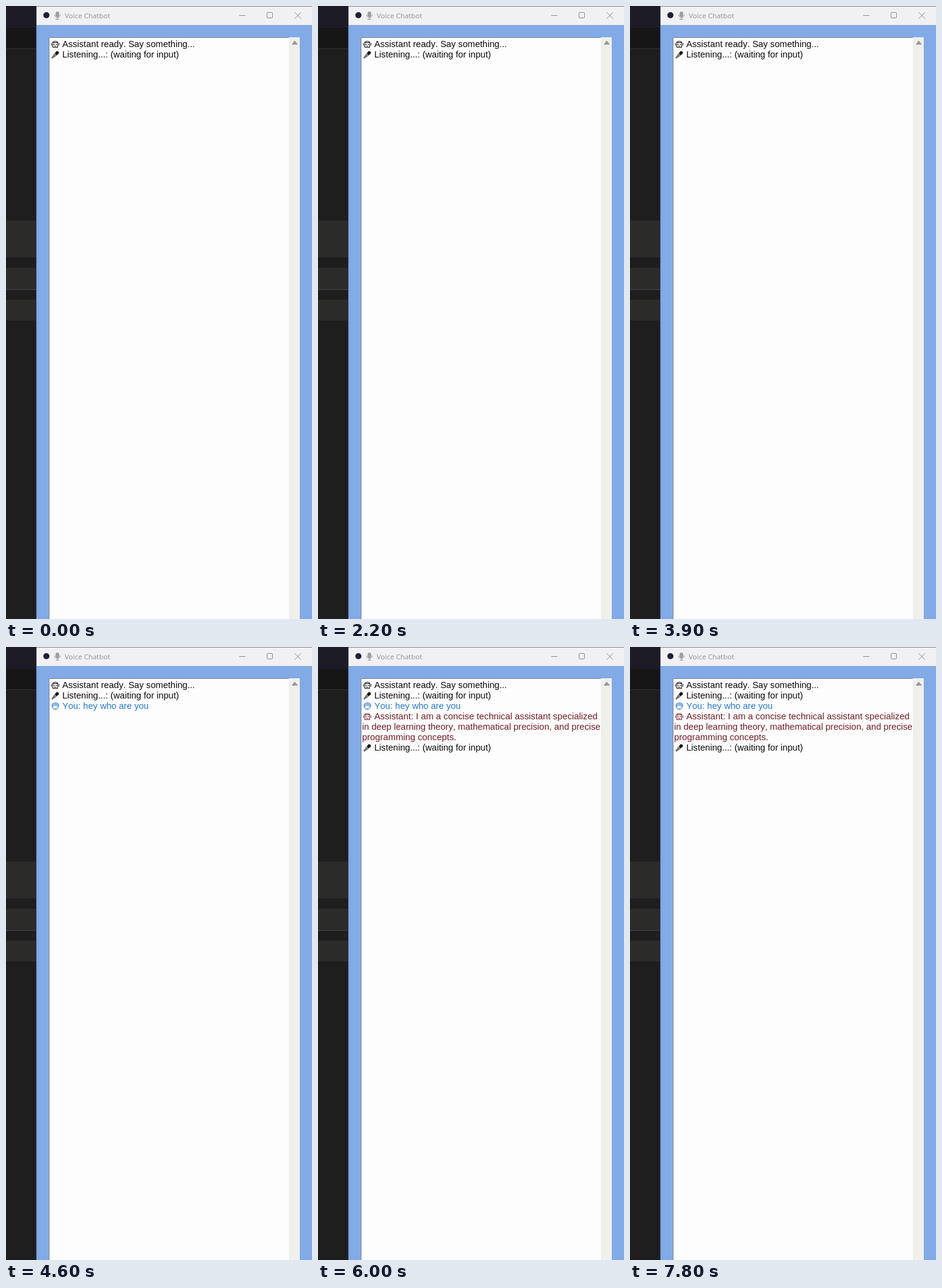
An HTML page that plays this animation: 500 px wide and 1000 px high, repeating every 8 s.

```html
<!DOCTYPE html>
<html lang="en">
<head>
<meta charset="utf-8">
<title>Voice Chatbot</title>
<style>
  html, body { margin: 0; width: 100%; height: 100%; overflow: hidden; background: #1e1e1e; }
  svg { display: block; width: 100vw; height: 100vh; }
  .chat { font-family: "Liberation Sans", Arial, sans-serif; font-kerning: none; }
  .title { font: 11.5px "Open Sans", "Noto Sans", sans-serif; }
</style>
</head>
<body>
<svg viewBox="0 0 500 1000" preserveAspectRatio="none">
  <defs>
    <g id="robot" fill="none" stroke="currentColor">
      <path d="M2.500 2.500Q6.500 .2 10.500 2.500V11.500H2.500Z"/>
      <path d="M.5 4.500V8.500M12.500 4.500V8.500M2.500 3.500H10.500"/>
      <path d="M4.500 9.500H8.500"/>
      <path d="M4 6.500H5.500M7.500 6.500H9" stroke-width="1.500"/>
    </g>
    <g id="mic" stroke="currentColor" fill="none">
      <path d="M.8 11.500L5.500 5L8 7.500L1.500 12.200Z"/>
      <path d="M3.500 9.500L6 7"/>
      <path d="M6 3.500L9.500 7" stroke-width="1.200"/>
      <circle cx="9.700" cy="3.300" r="2.300" fill="currentColor"/>
    </g>
    <g id="person" fill="none" stroke="currentColor">
      <path d="M2 6.500V8.500Q3 12.300 6.500 12.300T11 8.500V6.500"/>
      <path d="M1.500 7.500Q0 3 4 1.800Q9 -.2 11.500 3Q12.700 5 11.500 7.500L9.500 4.500Q6 6 4 4.500Z"
            fill="currentColor" fill-opacity=".4"/>
      <path d="M4.500 7.300V8.300M8.500 7.300V8.300M5.300 10.300H7.700"/>
    </g>
  </defs>

  <rect width="50" height="1000" fill="#1e1e1e"/>
  <rect width="50" height="36" fill="#1d1b25"/>
  <rect y="36" width="50" height="33" fill="#161616"/>
  <rect y="69" width="50" height="1" fill="#303030"/>
  <g fill="#2b2b2a">
    <rect y="350" width="49" height="60"/>
    <rect y="427" width="49" height="35"/>
    <rect y="479" width="49" height="34"/>
  </g>
  <rect y="462" width="49" height="1" fill="#444"/>

  <rect x="50" width="450" height="1000" fill="#82aae6"/>
  <rect x="50" width="450" height="31" fill="#f1f1f3"/>
  <rect x="50" width="450" height="1" fill="#85858a"/>
  <rect x="49" width="1" height="1000" fill="#4b5668"/>

  <circle cx="66" cy="15" r="5" fill="#202038"/>
  <g fill="none" stroke="#969696">
    <rect x="81.500" y="9.500" width="5" height="8" rx="2.500" fill="#aaa"/>
    <path d="M79.500 14Q79.500 18.500 84 18.500T88.500 14M84 18.500V21M81 21.500H87M82 12.500H86M82 15.500H86"/>
  </g>
  <text class="title" x="96" y="20" fill="#919191">Voice Chatbot</text>
  <g fill="none" stroke="#8a8a8a">
    <path d="M381 15.500H391"/>
    <rect x="426.500" y="10.500" width="9" height="9" rx="1.500"/>
    <path d="M472 10.500L482 20.500M482 10.500L472 20.500"/>
  </g>

  <rect x="70" y="51" width="392" height="949" fill="#788398"/>
  <rect x="71" y="52" width="391" height="948" fill="#fdfdfd"/>
  <rect x="462" y="51" width="18" height="949" fill="#efefec"/>
  <path d="M467.500 62.500L471.800 57L476.200 62.500Z" fill="#999" stroke="#999" stroke-linejoin="round"/>

  <g id="log" class="chat"></g>
</svg>
<script>
  const LOOP = 8000, ASKED = 4000, ANSWERED = 6000;
  const BLACK = "#0a0a0a", BLUE = "#2878d0", MAROON = "#701c28";
  const log = document.getElementById("log");

  const lines = [
    { at: 0, icon: "robot", text: "Assistant ready. Say something..." },
    { at: 0, icon: "mic", text: "Listening...: (waiting for input)" },
    { at: ASKED, icon: "person", color: BLUE, text: "You: hey who are you" },
    { at: ANSWERED, icon: "robot", color: MAROON, size: 14.75,
      text: "Assistant: I am a concise technical assistant specialized" },
    { at: ANSWERED, color: MAROON, text: "in deep learning theory, mathematical precision, and precise" },
    { at: ANSWERED, color: MAROON, size: 14.75, text: "programming concepts." },
    { at: ANSWERED, icon: "mic", text: "Listening...: (waiting for input)" }
  ];

  function add(parent, tag, attrs) {
    const node = document.createElementNS("http://www.w3.org/2000/svg", tag);
    for (const key in attrs) node.setAttribute(key, attrs[key]);
    return parent.appendChild(node);
  }

  lines.forEach((line, i) => {
    const { icon, color = BLACK, size = 14.6, text } = line;
    const baseline = 67 + 17 * i;
    line.node = add(log, "g", { color, fill: color });
    if (icon) add(line.node, "use", { href: "#" + icon, x: 74, y: baseline - 11, fill: "none" });
    add(line.node, "text", { x: icon ? 92 : 72, y: baseline, "font-size": size }).textContent = text;
  });

  function render(time) {
    for (const { at, node } of lines) node.style.display = time >= at ? "" : "none";
  }

  function tick() {
    render(performance.now() % LOOP);
    requestAnimationFrame(tick);
  }
  tick();
</script>
</body>
</html>
```
